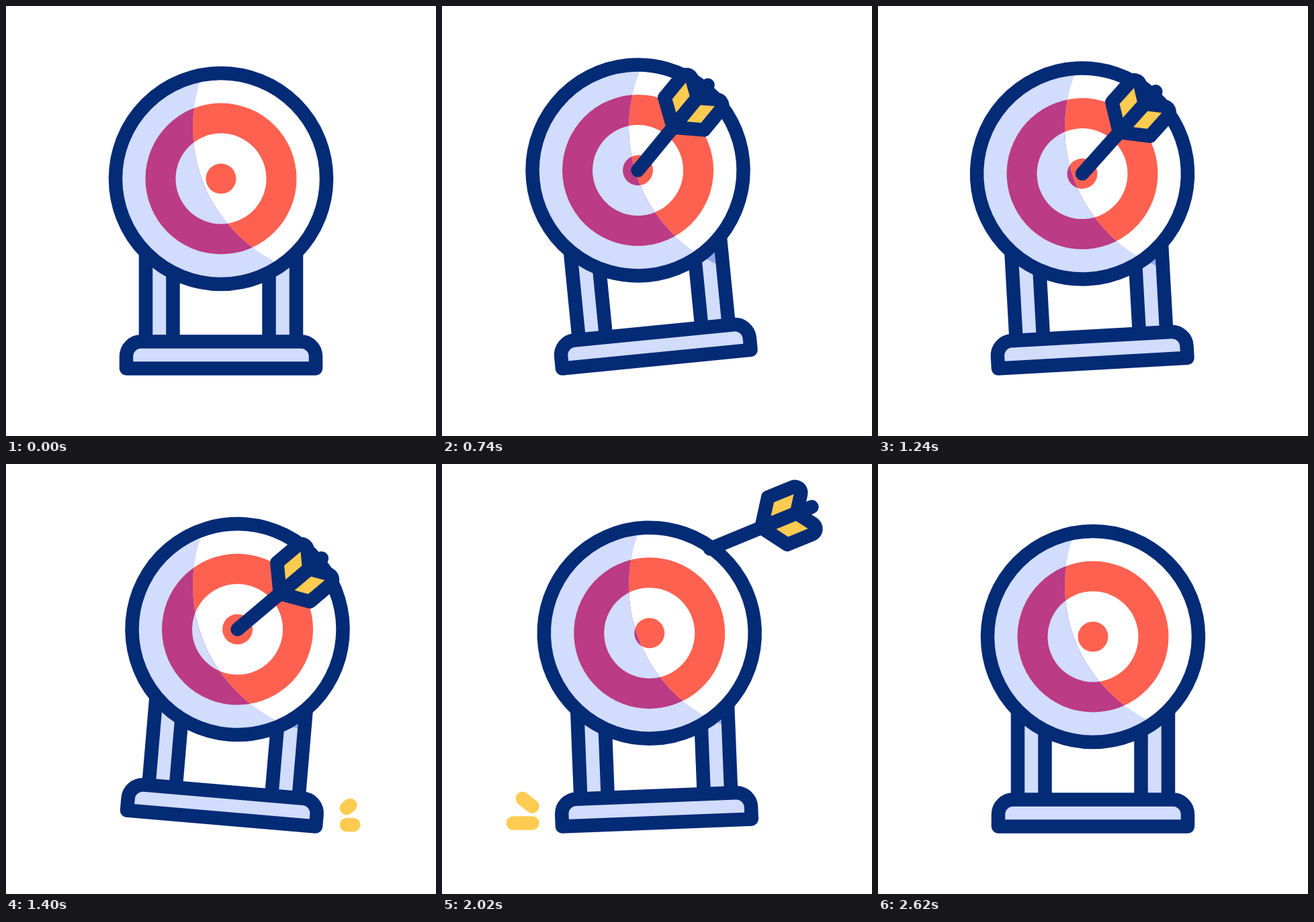
An HTML page with a canvas that plays this animation: 640 px wide and 640 px high, repeating every 3600 ms.

```html
<!DOCTYPE html>
<html lang="en">
<head>
<meta charset="utf-8">
<title>Target and dart</title>
<style>
  html, body { margin: 0; width: 100%; height: 100%; overflow: hidden; background: #fff; }
  canvas { display: block; width: 100vmin; height: 100vmin; }
</style>
</head>
<body>
<canvas id="stage"></canvas>
<script>
const LOOP = 3600, SIZE = 640, LINE = 20.5, RAD = Math.PI / 180;
const NAVY = '#032b76', RED = '#ff6150', PURPLE = '#bb3b85';
const LIGHT = '#d2dcfd', DEEP = '#92a9e8', YELLOW = '#ffcb50';
const BOARD = { x: 320, y: 257 };
const SHADE = { x: 501.3, y: 181, r: 223.3 };

// The stand tips over its left corner for negative angles, over its right one for positive.
const SWINGS = [
  { start: 640, peak: 935, end: 1325, angle: -8, rise: 2.9, fall: 2.1 },
  { start: 1325, peak: 1600, end: 1870, angle: 8, rise: 2.9, fall: 2.5 },
  { start: 1870, peak: 2070, end: 2250, angle: -2.4, rise: 2, fall: 2 },
  { start: 2250, peak: 2430, end: 2620, angle: 2, rise: 2, fall: 2 }
];

const canvas = document.getElementById('stage');
const ctx = canvas.getContext('2d');

const clamp = v => Math.min(1, Math.max(0, v));
const smooth = (t, start, length) => {
  const u = clamp((t - start) / length);
  return u * u * (3 - 2 * u);
};

function swingAngle(t) {
  const s = SWINGS.find(s => t >= s.start && t < s.end);
  if (!s) return 0;
  const away = t < s.peak
    ? ((s.peak - t) / (s.peak - s.start)) ** s.rise
    : ((t - s.peak) / (s.end - s.peak)) ** s.fall;
  return s.angle * (1 - away);
}

function tilt(angle) {
  const px = angle < 0 ? 179 : 461, py = 540;
  ctx.translate(px, py);
  ctx.rotate(angle * RAD);
  ctx.translate(-px, -py);
}

function disc(r, color) {
  ctx.beginPath();
  ctx.arc(BOARD.x, BOARD.y, r, 0, 7);
  ctx.fillStyle = color;
  ctx.fill();
}

function face(ground, paint) {
  disc(157, ground);
  disc(112.5, paint);
  disc(67.5, ground);
  disc(22.5, paint);
}

function line(x1, y1, x2, y2, color = NAVY) {
  ctx.beginPath();
  ctx.moveTo(x1, y1);
  ctx.lineTo(x2, y2);
  ctx.strokeStyle = color;
  ctx.stroke();
}

// Draws inside or outside the fixed shade circle, in the tilted frame.
function shaded(angle, outside, draw) {
  ctx.save();
  ctx.beginPath();
  if (outside) ctx.rect(0, 0, SIZE, SIZE);
  ctx.moveTo(SHADE.x + SHADE.r, SHADE.y);
  ctx.arc(SHADE.x, SHADE.y, SHADE.r, 0, 2 * Math.PI);
  ctx.clip('evenodd');
  tilt(angle);
  draw();
  ctx.restore();
}

function legFill(color) {
  ctx.fillStyle = color;
  ctx.fillRect(208, 340, 40.5, 155);
  ctx.fillRect(391.5, 340, 40.5, 155);
}

function stand() {
  for (const x of [208, 248.5, 391.5, 432]) line(x, 345, x, 495);
  ctx.beginPath();
  ctx.moveTo(179, 539.5);
  ctx.arcTo(179, 499.5, 201, 499.5, 22);
  ctx.arcTo(461, 499.5, 461, 521.5, 22);
  ctx.lineTo(461, 539.5);
  ctx.closePath();
  ctx.fillStyle = LIGHT;
  ctx.fill();
  ctx.stroke();
}

function rim() {
  ctx.beginPath();
  ctx.arc(BOARD.x, BOARD.y, 157, 0, 7);
  ctx.strokeStyle = NAVY;
  ctx.stroke();
}

function impactArc(t) {
  const head = smooth(t, 900, 140), tail = smooth(t, 1040, 140);
  if (head <= 0 || tail >= 1) return;
  const from = 142.5, span = 81.5;
  ctx.beginPath();
  ctx.arc(BOARD.x, BOARD.y, 67.5, (from + span * tail) * RAD, (from + span * head) * RAD);
  ctx.strokeStyle = YELLOW;
  ctx.stroke();
}

// Pitch of the dart in degrees; null while it is out of sight.
function dartPitch(t) {
  if (t < 300) return null;
  if (t < 640) return -12 + 57 * ((t - 300) / 340) ** 2;
  if (t < 1890) return 45;
  const pitch = 45 - 0.19 * (t - 1890);
  return pitch > -17 ? pitch : null;
}

function feather(side) {
  ctx.beginPath();
  ctx.moveTo(82.7, 0);
  ctx.lineTo(109, 38 * side);
  ctx.arcTo(166, 38 * side, 139.5, 0, 9);
  ctx.lineTo(139.5, 0);
  ctx.closePath();
  ctx.fillStyle = YELLOW;
  ctx.fill();
  ctx.strokeStyle = NAVY;
  ctx.stroke();
}

function dart(t) {
  const a = dartPitch(t);
  if (a === null) return;
  const p = a - 45, q = p * (a - 20.2);
  ctx.save();
  ctx.translate(390.7 - 4.742 * p + 0.0402 * q, 186.3 + 3.44 * p + 0.0534 * q);
  ctx.rotate(-a * RAD);
  ctx.translate(-100, 0);
  feather(-1);
  feather(1);
  line(0, 0, 164, 0);
  ctx.restore();
}

function spark(x, y, dx, dy, head, tail) {
  line(x + dx * tail, y + dy * tail, x + dx * head, y + dy * head, YELLOW);
}

function sparks(t, start, x, y, dir) {
  const head = smooth(t, start, 250), tail = smooth(t, start + 160, 200);
  if (head <= 0 || tail >= 1) return;
  spark(x, y, 41 * dir, 0, head, tail);
  spark(x, y - 25, 21 * dir, -16.5, head, tail);
}

function draw(t) {
  const scale = canvas.width / SIZE;
  ctx.setTransform(scale, 0, 0, scale, 0, 0);
  ctx.fillStyle = '#fff';
  ctx.fillRect(0, 0, SIZE, SIZE);
  ctx.lineWidth = LINE;
  ctx.lineCap = ctx.lineJoin = 'round';

  const angle = swingAngle(t);
  const tilted = paint => {
    ctx.save();
    tilt(angle);
    paint();
    ctx.restore();
  };
  tilted(() => legFill(LIGHT));
  shaded(angle, false, () => legFill(DEEP));
  tilted(() => { stand(); face('#fff', RED); });
  shaded(angle, true, () => face(LIGHT, PURPLE));
  tilted(() => { rim(); impactArc(t); dart(t); });

  sparks(t, 1320, 507, 537, 1);
  sparks(t, 1862, 134.5, 534.5, -1);
}

function resize() {
  const side = Math.min(innerWidth, innerHeight) || SIZE;
  canvas.width = canvas.height = Math.round(side * (window.devicePixelRatio || 1));
}

const began = performance.now();
function tick() {
  draw((performance.now() - began) % LOOP);
  requestAnimationFrame(tick);
}
addEventListener('resize', resize);
resize();
tick();
</script>
</body>
</html>
```
